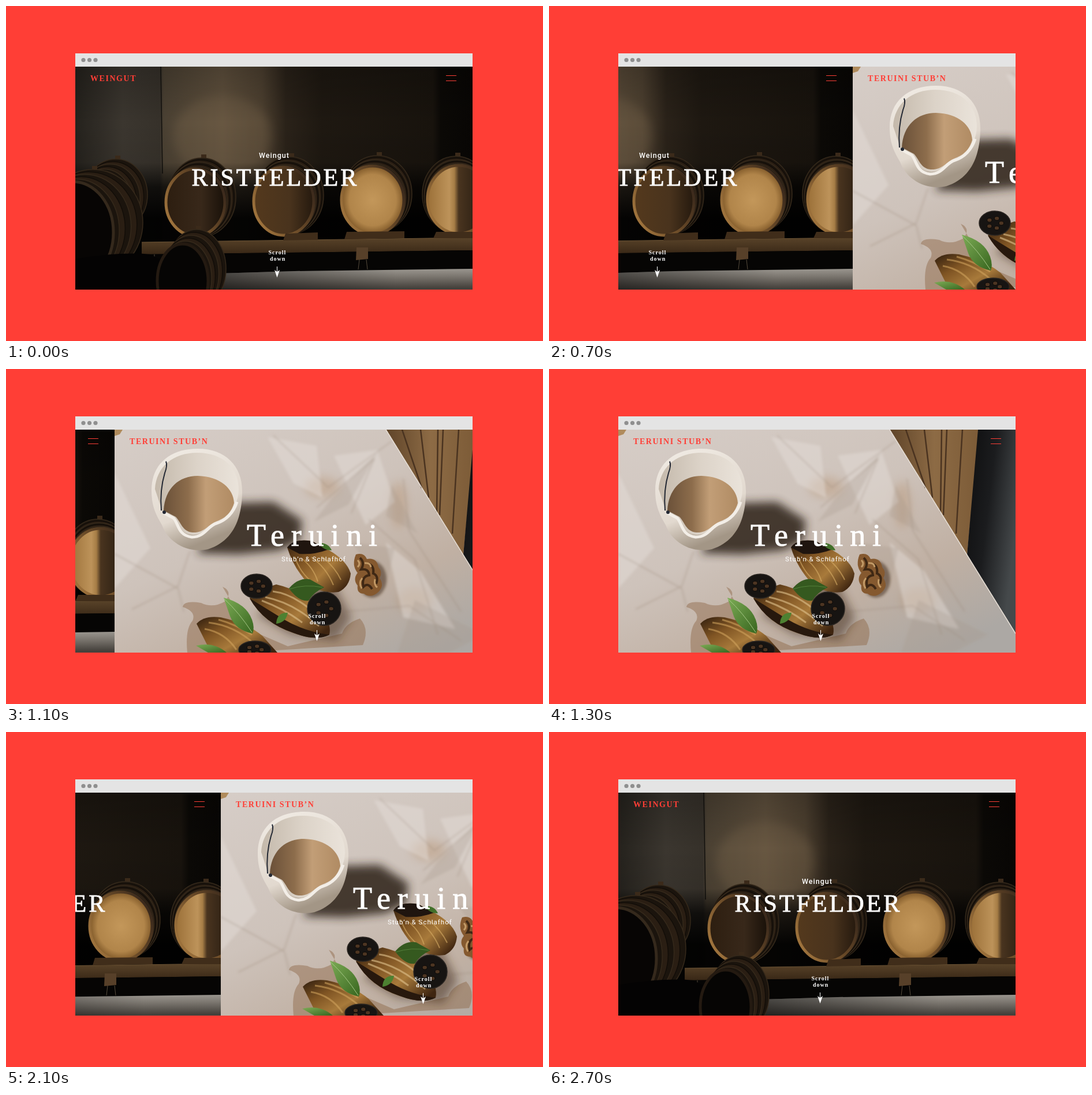
Write an HTML page that moves like this. It is 930 by 580 pixels and loops after 2800 ms.

```html
<!DOCTYPE html>
<html lang="de">
<head>
<meta charset="utf-8">
<title>Weingut</title>
<style>
  html, body { margin: 0; width: 100%; height: 100%; overflow: hidden; background: #ff3e36; }
  svg { display: block; width: 930px; height: 580px; }
  text { fill: #fff; }
  .brand { font: bold 14px "Liberation Serif", serif; letter-spacing: 1.55px; fill: #ff3e36; }
  .serif { font-family: "Liberation Serif", serif; stroke: #fff; stroke-width: .9px; }
  .sans { font-family: Roboto, sans-serif; letter-spacing: 1px; }
  .hint { font: bold 10px "Liberation Serif", serif; letter-spacing: 1px; }
</style>
</head>
<body>
<svg viewBox="0 0 930 580" xmlns="http://www.w3.org/2000/svg">
  <defs>
    <clipPath id="view"><rect x="120" y="105" width="688" height="386"/></clipPath>
    <filter id="soft" x="-30%" y="-30%" width="160%" height="160%"><feGaussianBlur stdDeviation="8"/></filter>
    <filter id="haze" x="-30%" y="-30%" width="160%" height="160%"><feGaussianBlur stdDeviation="2"/></filter>
    <linearGradient id="wall">
      <stop offset="0" stop-color="#25221d"/><stop offset=".12" stop-color="#3b362f"/>
      <stop offset=".213" stop-color="#36312a"/><stop offset=".222" stop-color="#4b4133"/>
      <stop offset=".37" stop-color="#5f503d"/><stop offset=".47" stop-color="#4d4030"/>
      <stop offset=".53" stop-color="#2a2219"/><stop offset=".62" stop-color="#1e1811"/>
      <stop offset=".9" stop-color="#18130d"/><stop offset=".92" stop-color="#0b0906"/><stop offset="1" stop-color="#080604"/>
    </linearGradient>
    <linearGradient id="dusk" x2="0" y2="1">
      <stop offset="0" stop-opacity=".2"/><stop offset=".25" stop-opacity="0"/>
      <stop offset=".43" stop-opacity=".06"/><stop offset=".54" stop-opacity=".7"/><stop offset=".68" stop-opacity=".95"/>
    </linearGradient>
    <linearGradient id="rim" x1="0" y1=".8" x2="1" y2=".2">
      <stop offset="0" stop-color="#a5783f"/><stop offset=".5" stop-color="#6b4b28"/><stop offset="1" stop-color="#33241a"/>
    </linearGradient>
    <linearGradient id="dimFace"><stop offset="0" stop-color="#2d1e10"/><stop offset=".6" stop-color="#38281a"/><stop offset="1" stop-color="#191109"/></linearGradient>
    <linearGradient id="midFace"><stop offset="0" stop-color="#54391d"/><stop offset=".6" stop-color="#49331d"/><stop offset="1" stop-color="#25190e"/></linearGradient>
    <radialGradient id="litFace"><stop offset="0" stop-color="#c3975a"/><stop offset=".75" stop-color="#b1854a"/><stop offset="1" stop-color="#805929"/></radialGradient>
    <linearGradient id="halfFace">
      <stop offset="0" stop-color="#9b7038"/><stop offset=".35" stop-color="#bd935a"/>
      <stop offset=".43" stop-color="#a67d46"/><stop offset=".5" stop-color="#49341f"/><stop offset="1" stop-color="#1c140c"/>
    </linearGradient>
    <linearGradient id="beam" x2="0" y2="1"><stop offset="0" stop-color="#594329"/><stop offset="1" stop-color="#382716"/></linearGradient>
    <linearGradient id="floor" x2=".1" y2="1"><stop offset="0" stop-color="#a29e97"/><stop offset=".45" stop-color="#7b766f"/><stop offset="1" stop-color="#45413c"/></linearGradient>
    <linearGradient id="floorShade"><stop offset="0" stop-opacity=".5"/><stop offset=".7" stop-opacity="0"/></linearGradient>

    <linearGradient id="paper" x2=".8" y2="1">
      <stop offset="0" stop-color="#d6cdc7"/><stop offset=".45" stop-color="#cec3bb"/>
      <stop offset=".75" stop-color="#c0b0a3"/><stop offset="1" stop-color="#aca8a4"/>
    </linearGradient>
    <linearGradient id="board"><stop offset="0" stop-color="#5f4429"/><stop offset=".5" stop-color="#8d6b45"/><stop offset="1" stop-color="#7c5b37"/></linearGradient>
    <linearGradient id="slate" x2="1" y2=".5"><stop offset="0" stop-color="#0d0d0e"/><stop offset=".5" stop-color="#1b1c1e"/><stop offset="1" stop-color="#45494b"/></linearGradient>
    <linearGradient id="clay" x2=".35" y2="1"><stop offset="0" stop-color="#f1ece5"/><stop offset=".7" stop-color="#e2d9cf"/><stop offset="1" stop-color="#a39686"/></linearGradient>
    <linearGradient id="bowl"><stop offset="0" stop-color="#c4b9ab"/><stop offset=".5" stop-color="#dcd3c8"/><stop offset="1" stop-color="#eae3da"/></linearGradient>
    <linearGradient id="sauce"><stop offset="0" stop-color="#6b5139"/><stop offset=".35" stop-color="#8d6d4c"/><stop offset=".6" stop-color="#c29e77"/><stop offset="1" stop-color="#b08b63"/></linearGradient>
    <linearGradient id="roast" x2="1" y2=".8"><stop offset="0" stop-color="#2f1d0e"/><stop offset=".35" stop-color="#7f5423"/><stop offset=".65" stop-color="#a87a3b"/><stop offset="1" stop-color="#3f2510"/></linearGradient>
    <linearGradient id="leaf" x2="1" y2="1"><stop offset="0" stop-color="#7cab55"/><stop offset="1" stop-color="#38661f"/></linearGradient>

    <g id="hint">
      <text class="hint" x="454.5" y="429.5">Scroll</text>
      <text class="hint" x="457" y="441">down</text>
      <path d="M469 451h1v9l4-3-4.500 13-4.500-13 4 3z" fill="#fff"/>
    </g>
    <path id="menu" d="M762 120.500h18M762 129.500h18" stroke="#ff3e36"/>
  </defs>

  <rect width="930" height="580" fill="#ff3e36"/>
  <rect x="120" y="82" width="688" height="23" fill="#e4e4e4"/>
  <g fill="#8f8f8f"><circle cx="134" cy="93.500" r="3.600"/><circle cx="144.500" cy="93.500" r="3.600"/><circle cx="155" cy="93.500" r="3.600"/></g>

  <g clip-path="url(#view)">
    <g id="cellar" clip-path="url(#view)">
      <rect x="120" y="105" width="688" height="386" fill="url(#wall)"/>
      <ellipse cx="375" cy="225" rx="85" ry="70" fill="#7b684d" opacity=".3" filter="url(#soft)"/>
      <path d="M268 105L271 290" stroke="#12100d" stroke-width="1.500"/>
      <rect x="120" y="105" width="688" height="386" fill="url(#dusk)"/>
      <g id="row"></g>
      <path d="M235 409L808 401V423L235 430Z" fill="url(#beam)"/>
      <path d="M235 409L808 401" stroke="#6a5234"/>
      <path d="M484 394l56-2v13l-60 1zM590 391l100-1v12l-104 2zM745 391h63v11h-68z" fill="#402d1a"/>
      <path d="M235 430L808 423V491H235Z" fill="#060504"/>
      <path d="M370 463L500 459 808 455V491H370Z" fill="url(#floor)"/>
      <path d="M370 463L500 459 808 455V491H370Z" fill="url(#floorShade)"/>
      <path d="M607 418h20v20l-21 2z" fill="#574029"/>
      <path d="M612 439l-2 17M624 439l2 17M257 430v14" stroke="#554b3c" fill="none"/>
      <g id="front"></g>
      <text class="brand" x="146" y="130">WEINGUT</text>
      <use href="#menu"/>
      <text class="sans" x="438" y="263" font-size="12.500" font-weight="500">Weingut</text>
      <text class="serif" x="321.500" y="311" font-size="42" letter-spacing="4">RISTFELDER</text>
      <use href="#hint"/>
    </g>

    <g id="kitchen" clip-path="url(#view)">
      <rect x="120" y="105" width="688" height="386" fill="url(#paper)"/>
      <path d="M120 105h14l-5 8-9 3z" fill="#b08b5c"/>
      <g fill="#b0835a" opacity=".3" filter="url(#soft)">
        <ellipse cx="612" cy="235" rx="14" ry="40"/><ellipse cx="640" cy="400" rx="30" ry="22"/><ellipse cx="480" cy="205" rx="30" ry="18"/>
      </g>
      <g filter="url(#haze)">
        <path d="M120 180l62 130-62 70zM500 150l75-10 30 90-50 40zM385 118l85 15 10 90-50-25zM590 300l60 50 60 100-90-20z" fill="#e4ded9" opacity=".45"/>
        <path d="M575 145l-80 80-30 40 60-30zM600 200l45 85-55-30zM530 300l75 10-15 70zM640 400l120 60-60 31h-90z" fill="#a7978a" opacity=".28"/>
        <path d="M120 320l110 60 10 40M250 316l-20 60-80 40M395 115l95 90 110-80M470 240l100-85-40 95M560 260l80 70 40 130M620 190l10 90 90 140M520 420l110-10 90 60" fill="none" stroke="#978577" stroke-width="1.500" opacity=".5"/>
      </g>
      <path d="M590 105H745L724 322Z" fill="url(#board)"/>
      <path d="M618 105l34 101M650 105l14 118M680 105l-2 143M689 105l-6 148M716 105l-11 180" stroke="#4a3320" stroke-width="2.500" fill="none"/>
      <path d="M743 105H808V458L724 322Z" fill="url(#slate)"/>
      <path d="M590 105L808 458" stroke="#e7dfd6" stroke-width="1.500"/>

      <path d="M325 232L395 230 445 262 440 298 405 314 335 321 262 319Z" fill="#30281f" opacity=".88" filter="url(#soft)"/>
      <path d="M184 210C184 165 216 138 264 138C312 138 341 168 341 211C341 258 326 298 282 312C244 320 212 298 202 270C190 250 184 235 184 210Z" fill="url(#clay)"/>
      <path d="M190 208C192 170 221 145 263 145C309 145 335 172 335 209C334 235 321 255 298 264C281 270 279 287 256 287C233 286 232 267 222 257L203 247Z" fill="url(#bowl)"/>
      <path d="M205 245C207 206 232 185 264 185C303 186 326 207 327 232C322 250 310 259 296 264C281 270 276 284 255 283C237 281 235 265 226 256Z" fill="url(#sauce)"/>
      <path d="M203 248L222 258C231 267 229 288 254 291C278 290 280 272 297 267C313 262 326 249 332 230" fill="none" stroke="#f3eee7" stroke-width="5"/>
      <path d="M209 160q3 7-2 20-9 30-6 65" fill="none" stroke="#232833" stroke-width="2"/>
      <circle cx="206" cy="248" r="3" fill="#232833"/>

      <path d="M307 377Q325 385 312 402Q290 415 270 405Q240 400 238 412Q262 420 255 436Q242 450 246 491H330L550 478Q562 450 545 432Q520 440 514 458L420 480 350 450Z" fill="#8f6a4a" opacity=".48"/>
      <path d="M365 425l60 35 80 10 25-40-30-60-60 10z" fill="#3c2817" opacity=".5" filter="url(#soft)"/>

      <path d="M419 309Q430 293 462 298L490 313Q522 331 529 354Q527 377 508 386Q480 390 456 372Q430 345 419 309Z" fill="url(#roast)"/>
      <path d="M419 309Q430 293 462 298L489 313Q465 322 440 320Z" fill="#1f150f"/>
      <path d="M444 328q20 15 28 40M461 326q25 17 38 48M480 325q23 20 32 40M432 325q8 25 28 42" stroke="#d8ad66" stroke-width="2" fill="none" opacity=".6"/>
      <path d="M473 301q18 0 23 13-15 0-23-13z" fill="#42702a"/>
      <g id="walnut">
        <ellipse cx="566" cy="364" rx="25" ry="32" fill="#3c2817" opacity=".5" filter="url(#haze)"/>
        <path d="M538 321Q552 317 557 329Q574 326 577 343Q585 352 579 362Q588 375 577 386Q564 398 552 389Q539 389 541 375Q532 364 541 353Q530 340 538 321Z" fill="#85592f"/>
        <path d="M545 327q9 8 2 20 13-2 14 10-14 2-10 20 8-8 15 4M560 337q10 4 8 17 10 4 5 18" fill="none" stroke="#3f2814" stroke-width="4"/>
        <path d="M541 331q6 6 0 12M553 336q10-1 11 7M549 362q-7 8-1 18M571 364q-2 10 4 14" fill="none" stroke="#c29a66" stroke-width="3"/>
      </g>

      <path d="M354 397Q370 382 400 373Q440 382 474 412Q497 440 492 460Q470 472 430 457Q378 440 354 397Z" fill="url(#roast)"/>
      <path d="M354 397Q378 440 430 457Q470 472 492 460Q450 455 414 434Q375 410 354 397Z" fill="#27180d"/>
      <path d="M381 395q50 10 93 50M394 385q35 4 73 38M375 401q40 15 70 38" stroke="#dfc28d" stroke-width="3" fill="none" opacity=".6"/>
      <path d="M262 441Q275 426 304 430Q350 440 376 462L402 491H287Z" fill="url(#roast)"/>
      <path d="M283 439q45 5 80 38M276 450q35 6 55 36M300 434q30 8 58 26" stroke="#d4a75f" stroke-width="3" fill="none" opacity=".55"/>
      <g id="slices"></g>

      <path d="M309 396Q348 406 358 434Q363 448 359 458Q329 452 320 428Z" fill="url(#leaf)"/>
      <path d="M310 398Q336 422 358 456" stroke="#a8c888" fill="none"/>
      <path d="M422 380Q438 361 458 364L483 378Q464 387 456 401Q440 404 422 380Z" fill="#35591f"/>
      <path d="M423 381Q450 372 480 378" stroke="#55823b" fill="none"/>
      <path d="M400 441q1-20 20-19-3 17-20 19z" fill="#4d8131"/>
      <path d="M261 479Q292 472 314 491H282Z" fill="url(#leaf)"/>

      <text class="brand" x="146" y="130">TERUINI STUB’N</text>
      <use href="#menu" x="3"/>
      <text class="serif" x="349" y="306" font-size="54" letter-spacing="11.800">Teruini</text>
      <text class="sans" x="409" y="333" font-size="11.500">Stub’n &amp; Schlafhof</text>
      <use href="#hint" x="1" y="1"/>
    </g>
  </g>
</svg>
<script>
  const $ = id => document.getElementById(id);
  const mix = (a, b, k) => a + (b - a) * k;

  function add(parent, tag, attrs) {
    const el = document.createElementNS("http://www.w3.org/2000/svg", tag);
    for (const key in attrs) el.setAttribute(key, attrs[key]);
    return parent.appendChild(el);
  }

  const oval = (parent, [cx, cy, rx, ry], style) => add(parent, "ellipse", { cx, cy, rx, ry, ...style });

  // Staves and hoops run from the back ellipse to the front one.
  function barrel(parent, back, front, face, rim) {
    add(parent, "rect", { x: back[0] - 1, y: back[1] - back[3] - 6, width: 9, height: 9, fill: "#3b2a1a" });
    for (let i = 0; i < 5; i++) {
      const shape = back.map((v, j) => mix(v, front[j], i / 5));
      oval(parent, shape, { fill: i % 2 ? "#2a1e13" : "#1b140d", stroke: i % 2 ? "#120d08" : "#35291b", "stroke-width": 1.5 });
    }
    oval(parent, front, { fill: face, stroke: rim, "stroke-width": 5 });
  }

  const row = $("row"), front = $("front");
  barrel(row, [190, 327, 55, 62], [165, 345, 48, 58], "#0d0a07", "#2c2116");
  barrel(row, [339, 331, 59, 68], [328, 340, 51, 58], "url(#dimFace)", "url(#rim)");
  barrel(row, [491, 328, 59, 67], [481, 338, 52, 59], "url(#midFace)", "url(#rim)");
  barrel(row, [643, 325, 60, 66], [635, 336, 54, 59], "url(#litFace)", "url(#rim)");
  barrel(row, [779, 326, 58, 66], [784, 335, 54, 59], "url(#halfFace)", "url(#rim)");

  barrel(front, [150, 375, 87, 92], [116, 392, 70, 88], "#070504", "#35291c");
  add(front, "path", { d: "M120 438Q200 425 250 430L290 450V491H120Z", fill: "#040303" });
  barrel(front, [330, 455, 51, 68], [306, 476, 44, 64], "#060504", "#241a11");

  // Dark fruit slices with a ring of seeds.
  for (const [x, y, rx, ry] of [[366, 376, 27, 21], [483, 415, 29, 29], [363, 486, 28, 15]]) {
    oval($("slices"), [x, y, rx, ry], { fill: "#171412", stroke: "#2b2622", "stroke-width": 1.5 });
    for (let a = 0; a < 5; a++)
      oval($("slices"), [x + Math.cos(a * 1.26) * rx * .42, y + Math.sin(a * 1.26) * ry * .42, 4.2, 3.4],
        { fill: "#4d3522", stroke: "#090807" });
  }

  const LOOP = 2800, WIDTH = 688, STRIDE = 84.5;
  const steps = (t, from) => Math.floor((t - from) / 100);

  function scroll(t) {
    if (t < 500) return 0;
    if (t < 1900) return Math.min(WIDTH, 113 + STRIDE * steps(t, 500));
    return Math.max(0, 605 - STRIDE * steps(t, 1900));
  }

  function draw(t) {
    const x = Math.round(scroll(t));
    $("cellar").setAttribute("transform", `translate(${-x})`);
    $("kitchen").setAttribute("transform", `translate(${WIDTH - x})`);
  }

  const start = performance.now();
  function tick() {
    draw((performance.now() - start) % LOOP);
    requestAnimationFrame(tick);
  }
  tick();
</script>
</body>
</html>
```
